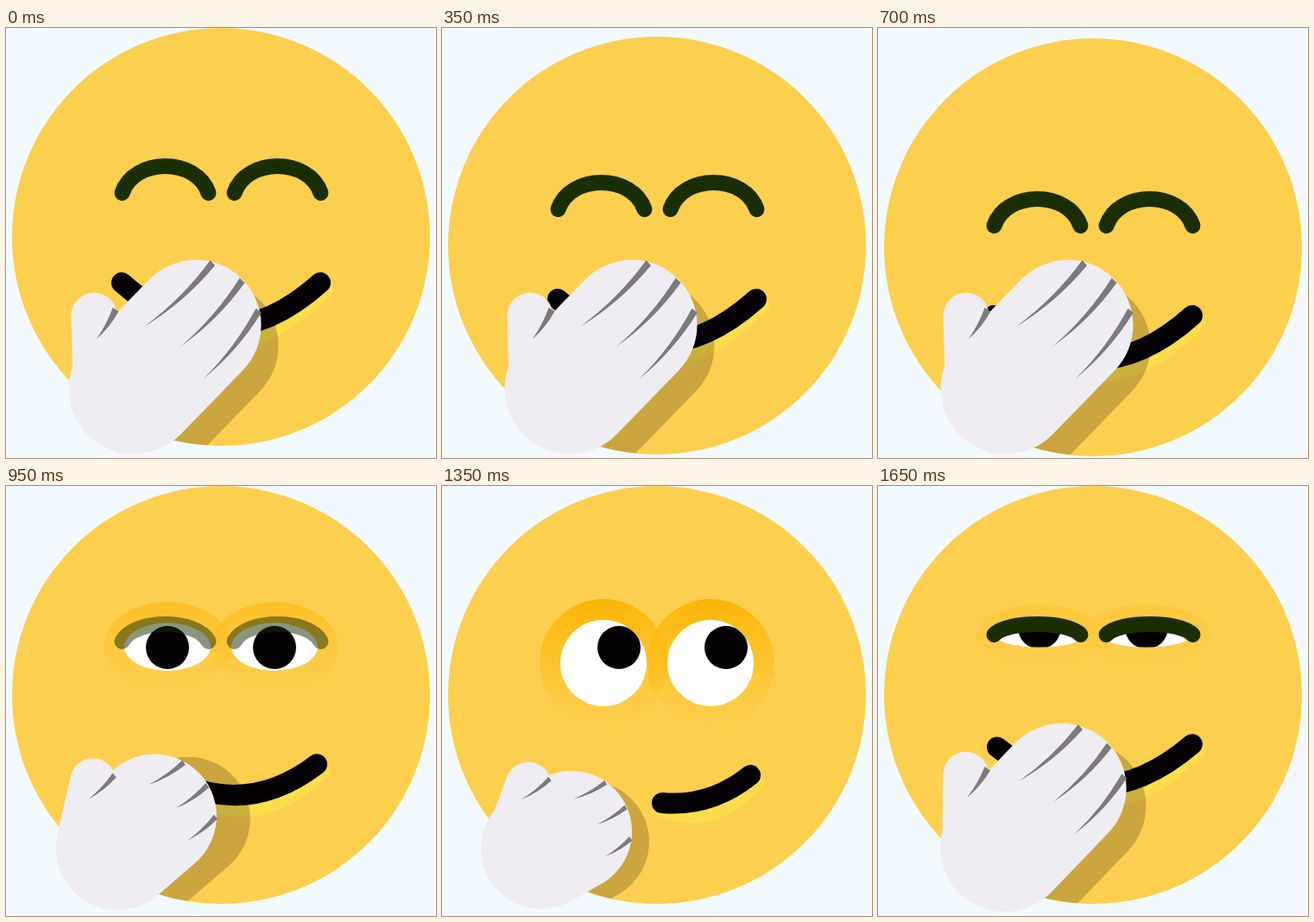
An HTML page with a canvas for the animation above (1.7 s loop, 498 px wide and 498 px high).

```html
<!DOCTYPE html>
<html lang="en">
<head>
<meta charset="utf-8">
<title>Giggle</title>
<style>
html, body { margin: 0; width: 100%; height: 100%; overflow: hidden; background: #f3faff; }
canvas { display: block; width: 498px; height: 498px; }
</style>
</head>
<body>
<canvas id="stage" width="498" height="498"></canvas>
<script>
const ctx = document.getElementById('stage').getContext('2d');
const LOOP = 1700, STEP = 50, GIGGLE = 800, BOUNCE = 200;
const BLACK = '#030104', GLOVE = '#efedf2', CREASE = '#7d797c', SHADE = '#caa63e';
const RAD = Math.PI / 180;

const mix = (a, b, k) => a + (b - a) * k;

function ease(x) {
  x = Math.min(1, Math.max(0, x));
  return x * x * (3 - 2 * x);
}

// Rises from a to b, holds, falls from c to d
const swell = (t, a, b, c, d) => ease((t - a) / (b - a)) * (1 - ease((t - c) / (d - c)));

function oval(x, y, rx, ry = rx) {
  const p = new Path2D();
  p.ellipse(x, y, rx, ry, 0, 0, Math.PI * 2);
  return p;
}

function fill(path, color) {
  ctx.fillStyle = color;
  ctx.fill(path);
}

function stroke(d, width, color) {
  ctx.lineWidth = width;
  ctx.strokeStyle = color;
  ctx.stroke(new Path2D(d));
}

function drawHalo(x, y, ry, alpha) {
  const g = ctx.createLinearGradient(0, y - ry, 0, y + ry);
  g.addColorStop(0, 'rgba(253,178,0,.95)');
  g.addColorStop(1, 'rgba(253,190,30,0)');
  ctx.globalAlpha = alpha;
  fill(oval(x, y, 74, ry), g);
  ctx.globalAlpha = 1;
}

function drawEyes(t, dy) {
  const ry = 50 * swell(t, 800, 1080, 1550, 1700);
  const look = 18 * swell(t, 950, 1150, 1430, 1600);
  const y = 163 + .84 * ry;
  if (ry > 8) {
    for (const x of [187, 311]) drawHalo(x, y, ry + 24, ry / 50);
    for (const x of [187, 311]) {
      const ball = oval(x, y, 50, ry);
      fill(ball, '#fff');
      ctx.save();
      ctx.clip(ball);
      fill(oval(x + look, Math.min(187, 143 + 1.6 * ry), 25), BLACK);
      ctx.restore();
    }
  }
  // Lids flatten, then arch again while fading out
  const lift = Math.min(1, ry / 43);
  const end = 191 - 19 * Math.sin(Math.PI * Math.sqrt(lift));
  const top = (640 - end) / 3;
  ctx.globalAlpha = Math.min(1, 1.43 * (1 - lift));
  for (const x of [134.5, 264.5])
    stroke(`M${x} ${end + dy}C${x + 14} ${top + dy} ${x + 86} ${top + dy} ${x + 100} ${end + dy}`, 18, '#1a2e05');
  ctx.globalAlpha = 1;
}

function mouthPath(open, dy, grow = 0) {
  const k = open ** 1.5, shift = grow * 4;
  const x0 = mix(134, 255, k) + shift, y0 = mix(295, 367, open) + dy + grow * 7;
  const cx = mix(249, 311, k) + shift, cy = mix(398, 372, open) + dy + grow * 22;
  const x1 = mix(364, 357, k) + shift, y1 = mix(295, 335, open) + dy + grow * 7;
  return `M${x0} ${y0}Q${cx} ${cy} ${x1} ${y1}`;
}

// A bowed wedge, wide at (x, y) and pointed at the far end
function drawCrease(x, y, angle, length, half) {
  const c = Math.cos(angle * RAD), s = Math.sin(angle * RAD);
  const at = (along, side) => `${x + c * along + s * side} ${y + s * along - c * side}`;
  const mid = length / 2, bow = length * .08;
  fill(new Path2D(`M${at(0, half)}Q${at(mid, bow + half * .6)} ${at(length, 0)}` +
    `Q${at(mid, bow - half * .6)} ${at(0, -half)}Z`), CREASE);
}

function drawHand(open, face) {
  const r = mix(75.5, 70, open);
  const tip = { x: mix(220, 150, open), y: mix(344, 400, open) };
  const thumb = { x: mix(102, 100, open), y: mix(333, 346, open) };
  const palm = `M${mix(148, 115, open ** 1.5)} ${mix(418, 420, open)}L${tip.x} ${tip.y}`;
  const half = 4 - 1.2 * open;

  const push = Math.sin(Math.PI * open) ** 2;
  ctx.save();
  ctx.clip(face);
  ctx.translate(20 + 27 * push, 24 - 12 * open - 18 * push);
  stroke(palm, r * 2, 'rgba(0,0,0,.2)');
  ctx.restore();

  return () => {
    stroke(palm, r * 2, GLOVE);
    stroke(`M${thumb.x} ${thumb.y}L${mix(104, 78, open)} 405`, 53, GLOVE);
    for (let i = 0; i < 3; i++) {
      const a = (-75 + 20 * open + 31 * i) * RAD;
      drawCrease(tip.x + (r - 1) * Math.cos(a), tip.y + (r - 1) * Math.sin(a),
        137 + 16 * open - 4 * i, 42 + 66 * (1 - open) ** 2 - 3 * i, half);
    }
    drawCrease(thumb.x + 25, thumb.y - 7, mix(123, 144, open), 41, half);
  };
}

function draw(t) {
  const open = swell(t, 800, 1040, 1450, 1700);
  const phase = t < GIGGLE ? 2 * Math.PI * t / BOUNCE : 0;
  const sway = 1 - Math.cos(phase);
  const dy = 19 * sway;
  // The face trails its features a little
  const face = oval(249, 242 + 6 * sway - 4 * Math.sin(phase), 242);

  ctx.lineCap = 'round';
  ctx.fillStyle = '#f3faff';
  ctx.fillRect(0, 0, 498, 498);
  fill(face, '#fdcf4e');
  drawEyes(t, dy);
  stroke(mouthPath(open, dy, 1), 22, '#fbdd4b');
  const drawGlove = drawHand(open, face);
  stroke(mouthPath(open, dy), 24, BLACK);
  drawGlove();
}

const start = performance.now();
function tick() {
  const t = (performance.now() - start) % LOOP;
  draw(Math.floor(t / STEP) * STEP);
  requestAnimationFrame(tick);
}
tick();
</script>
</body>
</html>
```
